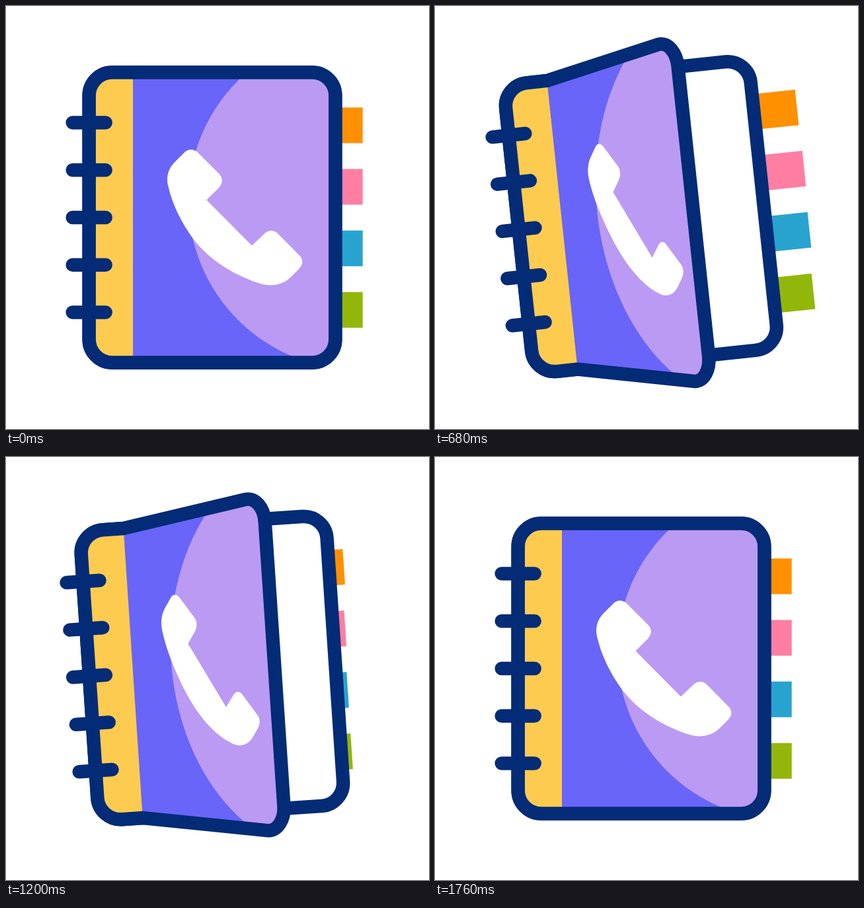
Animation, 640 px wide and 640 px high, one loop 2040 ms. Source, as an HTML page with a canvas:

```html
<!DOCTYPE html>
<html lang="en">
<head>
<meta charset="utf-8">
<title>Address book</title>
<style>
  html, body { margin: 0; width: 640px; height: 640px; overflow: hidden; background: #fff; }
  canvas { display: block; }
</style>
</head>
<body>
<canvas id="stage" width="640" height="640"></canvas>
<script>
const ctx = document.getElementById('stage').getContext('2d');
const LOOP = 2040, STEP = 40;
const NAVY = '#042b76', YELLOW = '#fdcb50', BLUE = '#6865f8', LILAC = '#bb9af3';
const TABS = ['#ff9100', '#ff7ea2', '#28a3cf', '#92b70a'];
const PIVOT = [299, 320];
const LEFT = 125.7, RIGHT = 498.3, TOP = 100.5, BOTTOM = 539.5, HINGE = 192, RADIUS = 35, LINE = 20.5;

// Free corner of the cover, closed and fully open: line end, two handles, edge start.
const CORNER_SHUT = [[463.3, 100.5], [482.6, 100.5], [498.3, 116.2], [498.3, 135.5]];
const CORNER_OPEN = [[365, 63.8], [380, 60.6], [391.3, 79], [391.3, 99]];

const HANDSET = `M303.5,293.5 L321.5,275.5 C328.5,268.5 328.5,260 322,253.5 L290.5,222
  C284,215.8 275.5,215.8 269.5,222 L255.5,236 C246,245.5 242,257.5 245,271
  C251.5,300 265,327 283,352 C308,384.5 345,408 388,421
  C403,424.5 419,421.5 430,411 L443.5,397.5 C450,391 450,383 443.5,377
  L412,345 C406,338.5 397.5,338.5 391,344.5 L372,362.5 Z`;

const lerp = (a, b, k) => a + (b - a) * k;
const clamp = x => Math.min(1, Math.max(0, x));
const sine = u => (1 - Math.cos(Math.PI * clamp(u))) / 2;

// Sine-eased value along [time, value] keys.
function track(t, keys) {
  let value = keys[0][1];
  for (let i = 1; i < keys.length; i++) {
    const [t0, v0] = keys[i - 1], [t1, v1] = keys[i];
    if (t >= t0) value = lerp(v0, v1, sine((t - t0) / (t1 - t0)));
  }
  return value;
}

const swing = t => track(t, [[200, 0], [560, -15], [840, 8], [1140, -4.4], [1450, 2.2], [1600, 0]]);
const tabLength = t => track(t, [[200, 31.2], [640, 56.5], [1040, 5.5], [1500, 31.2]]);
const opening = t => t < 1020
  ? track(t, [[200, 0], [520, 1]])
  : 1 - clamp((t - 1020) / 480) ** 2;

function line(x0, y0, x1, y1, color) {
  ctx.strokeStyle = color;
  ctx.lineCap = 'round';
  ctx.beginPath();
  ctx.moveTo(x0, y0);
  ctx.lineTo(x1, y1);
  ctx.stroke();
}

function coverPath(open) {
  const [a, b, c, d] = CORNER_SHUT.map((p, i) => p.map((v, j) => lerp(v, CORNER_OPEN[i][j], open)));
  const flip = ([x, y]) => [x, 640 - y];
  const path = new Path2D();
  path.moveTo(HINGE, TOP);
  path.lineTo(...a);
  path.bezierCurveTo(...b, ...c, ...d);
  path.lineTo(...flip(d));
  path.bezierCurveTo(...flip(c), ...flip(b), ...flip(a));
  path.lineTo(HINGE, BOTTOM);
  path.arcTo(LEFT, BOTTOM, LEFT, TOP, RADIUS);
  path.arcTo(LEFT, TOP, HINGE, TOP, RADIUS);
  path.closePath();
  return path;
}

// The earpiece and the mouthpiece narrow and drift apart as the cover opens.
function handsetPath(open) {
  return new Path2D(HANDSET.replace(/([\d.]+),([\d.]+)/g, (_, sx, sy) => {
    const x = +sx, y = +sy, low = clamp((x + y - 597) / 137);
    const wideX = 260 + 0.585 * (x - 280) + 8.3 * low;
    const wideY = 203.6 + 0.985 * (y - 217) + 36.7 * low;
    return lerp(x, wideX, open) + ',' + lerp(y, wideY, open);
  }));
}

function drawTabs(t) {
  TABS.forEach((color, i) => {
    ctx.fillStyle = color;
    ctx.fillRect(RIGHT, 153.5 + 93.1 * i, 10.2 + tabLength(t - 60 * i), 54);
  });
}

function drawPages() {
  ctx.beginPath();
  ctx.roundRect(LEFT, TOP, RIGHT - LEFT, BOTTOM - TOP, RADIUS);
  ctx.fillStyle = '#fff';
  ctx.fill();
  ctx.strokeStyle = NAVY;
  ctx.stroke();
}

function drawCover(open) {
  const cover = coverPath(open);
  ctx.save();
  ctx.clip(cover);
  ctx.fillStyle = BLUE;
  ctx.fillRect(0, 0, 640, 640);
  ctx.fillStyle = LILAC;
  ctx.beginPath();
  ctx.ellipse(lerp(532, 468.5, open), lerp(294, 308, open),
    lerp(256, 222, open), lerp(256, 316, open), 0, 0, 2 * Math.PI);
  ctx.fill();
  ctx.fillStyle = YELLOW;
  ctx.fillRect(0, 0, HINGE, 640);
  ctx.restore();

  ctx.fillStyle = '#fff';
  ctx.fill(handsetPath(open));
  ctx.strokeStyle = NAVY;
  ctx.stroke(cover);
  for (let i = -2; i <= 2; i++) {
    const y = 320 + 71.7 * i;
    line(100.7, y, 150.7, y, NAVY);
  }
}

function drawSparks(t) {
  const head = track(t, [[1440, 112], [1550, 135]]);
  const tail = track(t, [[1500, 112], [1740, 135]]);
  if (head - tail < 0.3) return;
  for (const degrees of [-39.6, 5.3, 49.8]) {
    const a = degrees * Math.PI / 180, c = Math.cos(a), s = Math.sin(a);
    line(489 + tail * c, 330 + tail * s, 489 + head * c, 330 + head * s, YELLOW);
  }
}

function draw(t) {
  ctx.fillStyle = '#fff';
  ctx.fillRect(0, 0, 640, 640);
  ctx.lineWidth = LINE;
  ctx.save();
  ctx.translate(...PIVOT);
  ctx.rotate(swing(t) * Math.PI / 180);
  ctx.translate(-PIVOT[0], -PIVOT[1]);
  drawTabs(t);
  drawPages();
  drawCover(opening(t));
  ctx.restore();
  drawSparks(t);
}

const start = performance.now();
function tick() {
  const t = (performance.now() - start) % LOOP;
  draw(Math.floor(t / STEP) * STEP);
  requestAnimationFrame(tick);
}
tick();
</script>
</body>
</html>
```
